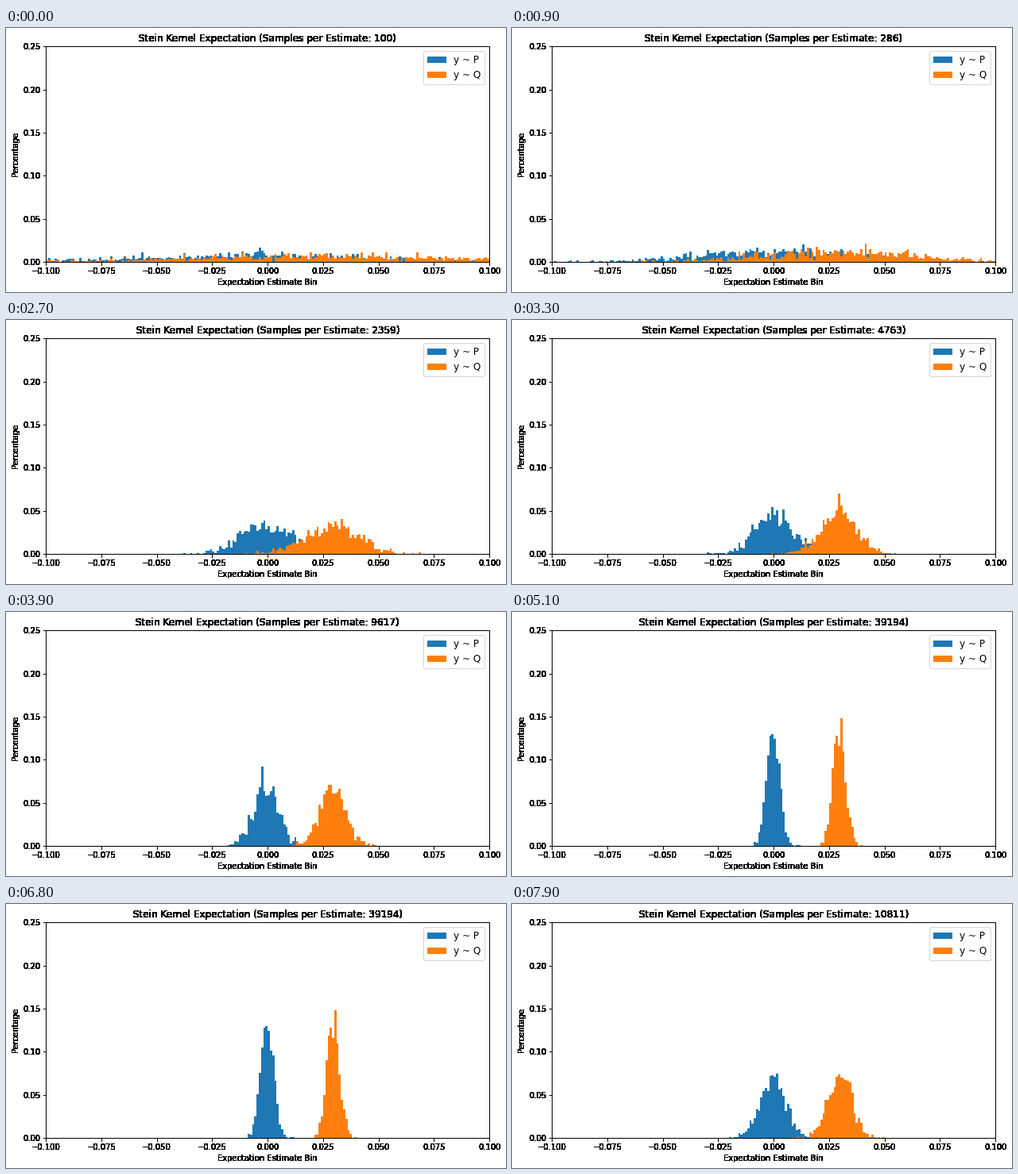
Recreate the animation shown at these times as a matplotlib script. Size 629 by 333 pixels, loop 8 s.

```python
import matplotlib.pyplot as plt
import numpy as np
from matplotlib.animation import FuncAnimation

WIDTH, HEIGHT, DPI = 629, 333, 72
LEFT, BOTTOM, AX_W, AX_H = 50.2, 37.8, 558, 271.8
FRAMES, INTERVAL = 80, 100

ESTIMATES = 1000
SPREAD = 0.58  # standard deviation of a single-sample estimate
MEANS = {"y ~ P": -0.0003, "y ~ Q": 0.0295}
EDGES = np.linspace(-0.1, 0.1, 201)
SAMPLE_COUNTS = np.logspace(2, 5, 60).astype(int)

rng = np.random.default_rng(7)
NOISE = rng.standard_normal((len(SAMPLE_COUNTS), len(MEANS), ESTIMATES))

plt.rcParams["font.family"] = "DejaVu Sans"


def harden(image, dpi):
    """Make every touched pixel fully opaque, for crisp heavy lettering."""
    image = image.copy()
    image[..., 3] = image[..., 3] > 0.02
    return image, 0, 0


def histogram(step, series, mean):
    sigma = SPREAD / np.sqrt(SAMPLE_COUNTS[step])
    counts, _ = np.histogram(mean + sigma * NOISE[step, series], EDGES)
    return counts / ESTIMATES


fig = plt.figure(figsize=(WIDTH / DPI, HEIGHT / DPI), dpi=DPI, facecolor="white")
ax = fig.add_axes([LEFT / WIDTH, BOTTOM / HEIGHT, AX_W / WIDTH, AX_H / HEIGHT])
bars = [
    ax.bar(EDGES[:-1], np.zeros(200), width=0.001, align="edge",
           color=color, label=label)
    for label, color in zip(MEANS, ("tab:blue", "tab:orange"))
]
ax.set_xlim(-0.1, 0.1)
ax.set_ylim(0, 0.25)
ax.set_xticks(np.linspace(-0.1, 0.1, 9))
ax.set_yticks(np.linspace(0, 0.25, 6))
ax.set_xlabel("Expectation Estimate Bin", fontsize=10)
ax.set_ylabel("Percentage", fontsize=10)
ax.legend(loc="upper right", fontsize=12)
title = ax.set_title("", fontsize=12)

for artist in (title, ax.xaxis, ax.yaxis, *ax.spines.values()):
    artist.set_agg_filter(harden)


def update(frame):
    # The sample count climbs to its maximum, then runs back down.
    last = len(SAMPLE_COUNTS) - 1
    step = frame if frame <= last else 2 * last + 1 - frame
    title.set_text("Stein Kernel Expectation "
                   f"(Samples per Estimate: {SAMPLE_COUNTS[step]})")
    for series, (group, mean) in enumerate(zip(bars, MEANS.values())):
        for bar, height in zip(group, histogram(step, series, mean)):
            bar.set_height(height)
            bar.set_visible(height > 0)
    return [title]


animation = FuncAnimation(fig, update, frames=FRAMES, interval=INTERVAL,
                          init_func=lambda: update(0), repeat=True)
plt.show()
```
